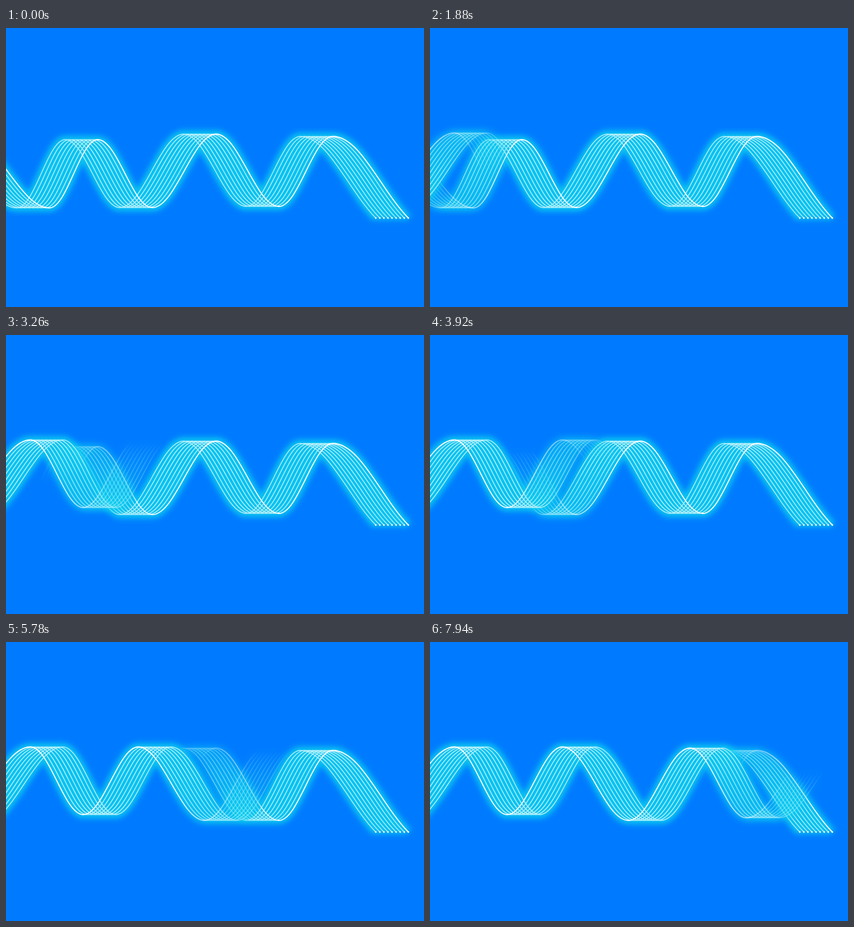
These frames come from a looping animation (720 px wide and 480 px high, 8 s). An HTML page:

```html
<!DOCTYPE html>
<html lang="en">
<head>
<meta charset="utf-8">
<title>Ribbon wave</title>
<style>
  html, body { margin: 0; width: 100%; height: 100%; overflow: hidden; background: #007bff; }
  svg { display: block; width: 100%; height: 100%; }
</style>
</head>
<body>
<svg id="stage" viewBox="0 0 720 480">
  <defs>
    <filter id="blur" filterUnits="userSpaceOnUse" x="-120" y="100" width="960" height="300" color-interpolation-filters="sRGB">
      <feGaussianBlur stdDeviation="5"/>
    </filter>
  </defs>
</svg>
<script>
const stage = document.getElementById('stage');
const defs = stage.querySelector('defs');
const LOOP = 8000, HOLD = 260, STEP = 60, SPEED = 5.2;
const LINES = 9, WIDTH = 56, GAP = WIDTH / (LINES - 1);
const FADE = 154, AHEAD = 5;
const gradients = [];

function add(parent, tag, attrs) {
  const node = document.createElementNS('http://www.w3.org/2000/svg', tag);
  for (const key in attrs) node.setAttribute(key, attrs[key]);
  return parent.appendChild(node);
}

// Peaks and troughs joined by curves with level tangents.
function wave(points) {
  return points.map(([x, y], i) => {
    if (!i) return `M${x} ${y}`;
    const [px, py] = points[i - 1];
    const h = (x - px) * 0.365;
    return `C${px + h} ${py} ${x - h} ${y} ${x} ${y}`;
  }).join('');
}

// A fading paint in each line's own coordinates, so the edge shifts with the line.
function fadingPaint(id, color, rising, power) {
  const node = add(defs, 'linearGradient', { id, gradientUnits: 'userSpaceOnUse', y1: 0, y2: 0 });
  for (let i = 0; i <= 8; i++) {
    const p = i / 8;
    add(node, 'stop', {
      offset: p,
      'stop-color': color,
      'stop-opacity': Math.pow(rising ? p : 1 - p, power)
    });
  }
  gradients.push({ node, offset: rising ? 0 : -WIDTH });
  return `url(#${id})`;
}

// Line 0 is the bright edge; the others lie to the side given by dir.
function addRibbon(id, d, dir, end) {
  const rising = dir < 0;
  const hazePaint = fadingPaint(id + 'Haze', '#0cd2ee', rising, 1.2);
  const bodyPaint = fadingPaint(id + 'Body', '#b2effa', rising, 0.75);
  const edgePaint = fadingPaint(id + 'Edge', '#ffffff', rising, 0.75);
  const haze = add(stage, 'g', {
    filter: 'url(#blur)', fill: 'none', stroke: hazePaint, 'stroke-width': 13, opacity: 0.82
  });
  const lines = add(stage, 'g', { fill: 'none' });
  for (let i = LINES - 1; i >= 0; i--) {
    const transform = `translate(${dir * i * GAP} 0)`;
    const paint = i ? bodyPaint : edgePaint;
    add(haze, 'path', { d, transform });
    add(lines, 'path', { d, transform, stroke: paint, 'stroke-width': i ? 1.5 : 1.8 });
    if (end) add(lines, 'circle', { cx: end[0], cy: end[1], r: 1.4, transform, fill: edgePaint });
  }
}

const leaving = wave([[-65, 190], [75, 309.5], [158, 192], [252, 309], [362, 182.5], [470, 307], [563, 186.5]])
  + 'C610 186.5 645 278 693 327';
const arriving = wave([[-93, 310], [42, 180.5], [133, 297], [228, 180.5], [342, 307], [448, 182.5], [545, 302.5], [670, 183]]);

addRibbon('leaving', leaving, -1, [693, 327]);
addRibbon('arriving', arriving, 1);

function draw(time) {
  const t = time % LOOP;
  const step = t < HOLD ? 0 : Math.floor((t - HOLD) / STEP) + 1;
  const lead = step * SPEED + (step ? AHEAD : 0);
  for (const { node, offset } of gradients) {
    node.setAttribute('x1', lead - FADE + offset);
    node.setAttribute('x2', lead + offset);
  }
}

function tick() {
  draw(performance.now());
  requestAnimationFrame(tick);
}
tick();
</script>
</body>
</html>
```
